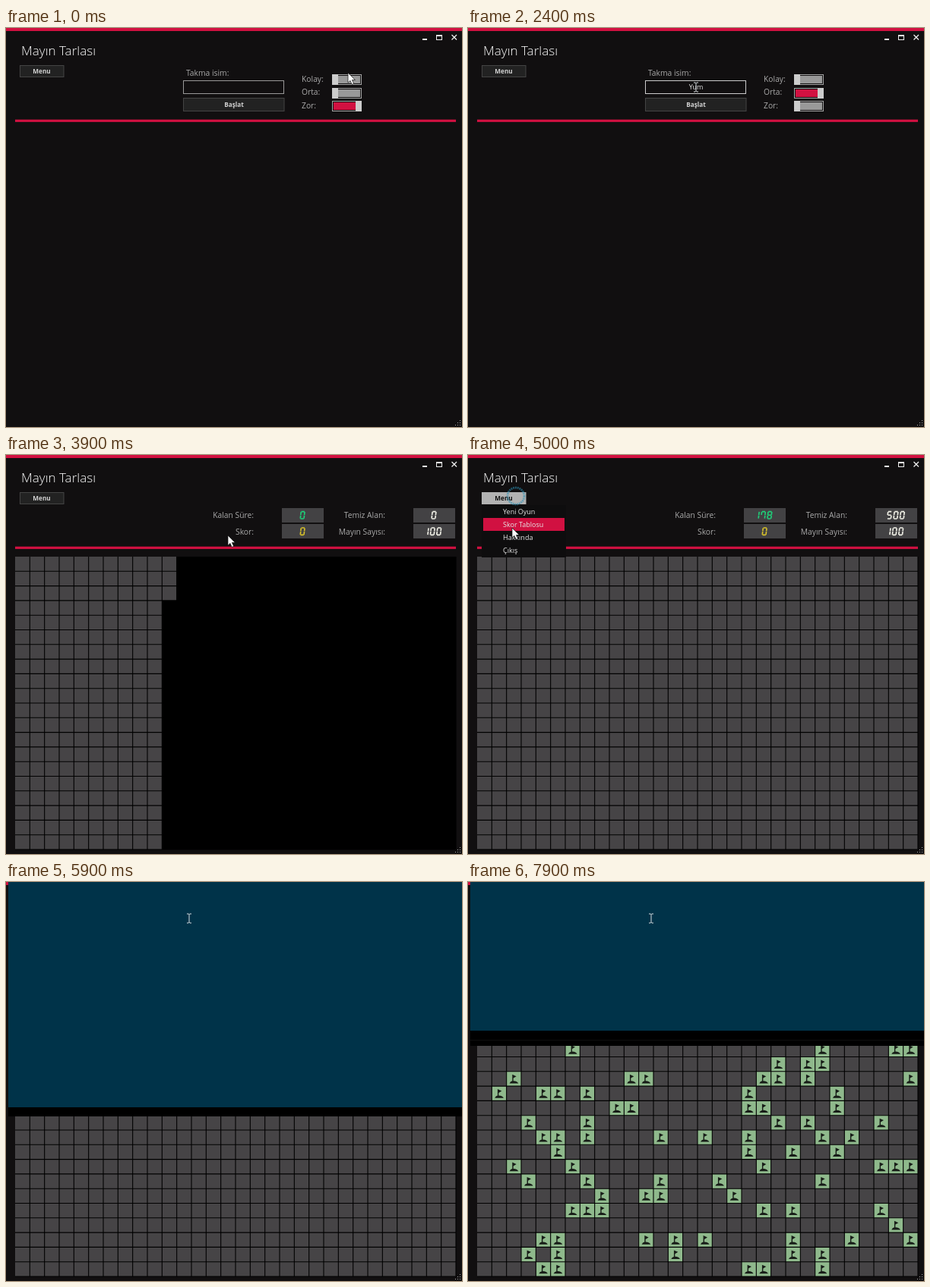
An HTML page for the animation above (8 s loop, 600 by 526 pixels).

```html
<!DOCTYPE html>
<html lang="tr">
<head>
<meta charset="utf-8">
<title>Mayın Tarlası</title>
<style>
  html, body { margin: 0; width: 100%; height: 100%; overflow: hidden; background: #110f10; }
  svg { display: block; width: 100vw; height: 100vh; }
  text { font-family: "Open Sans", "Noto Sans", sans-serif; fill: #dcdcdc; }
  .title { font-size: 17.1px; font-weight: 300; fill: #fff; }
  .label { font-size: 10.3px; fill: #aaa; }
  .btn { font-size: 8.2px; font-weight: 700; text-anchor: middle; }
  .item { font-size: 9px; fill: #e6e6e6; }
  .crisp { shape-rendering: crispEdges; }
  .end { text-anchor: end; }
</style>
</head>
<body>
<svg id="stage" viewBox="0 0 600 526"></svg>
<script>
const LOOP = 8000, STEP = 100;
const RED = '#d11141', BG = '#110f10', TILE = '#464446';
const COLS = 30, ROWS = 20, LEFT = 12, TOP = 134, CW = 580 / COLS, CH = 386 / ROWS;
const NAME = 'Yumak';

const colX = c => +(LEFT + c * CW).toFixed(2);
const rowY = r => +(TOP + r * CH).toFixed(2);
const clamp = (v, a = 0, b = 1) => Math.min(b, Math.max(a, v));
const ease = p => p * p * (3 - 2 * p);
const rect = (x, y, w, h, fill, extra = '') =>
  `<rect x="${x}" y="${y}" width="${w}" height="${h}" fill="${fill}" ${extra}/>`;
const text = (x, y, s, cls, extra = '') => `<text x="${x}" y="${y}" class="${cls}" ${extra}>${s}</text>`;

// Columns holding a mine, for each board row from FIRST_ROW down
const FIRST_ROW = 4;
const MINES = [
  [6, 23, 28, 29], [20, 22, 23], [2, 10, 11, 19, 20, 22, 29], [1, 4, 5, 7, 18, 24],
  [9, 10, 18, 19, 24], [3, 7, 20, 22, 27], [4, 5, 7, 12, 15, 18, 23, 25], [5, 18, 21, 24],
  [2, 6, 19, 27, 28, 29], [3, 7, 12, 16, 23], [8, 11, 12, 17], [6, 7, 8, 19, 21, 27],
  [28], [4, 5, 11, 13, 15, 21, 25, 29], [3, 5, 13, 21, 23], [4, 5, 18, 19, 23]
];

function flag(c, r) {
  const x = colX(c), y = rowY(r);
  return rect(x, y, CW, CH, '#8fb98c') +
    `<path transform="translate(${x} ${y})" fill="#171c17"
      d="M7.6 4L13 6.4L9 8.8V12.4Q14.5 12.8 15.5 15.6H4Q5 13 7.6 12.5Z"/>`;
}

function gridLines() {
  let d = '';
  for (let c = 1; c <= COLS; c++) d += `M${colX(c)} ${TOP}V520`;
  for (let r = 1; r <= ROWS; r++) d += `M${LEFT} ${rowY(r)}H592`;
  return `<path d="${d}" stroke="#000" stroke-width="1.1" fill="none"/>`;
}

const toggle = (id, y) =>
  rect(429.5, y + .5, 38, 13, BG, 'stroke="#a5a5a5"') +
  rect(431, y + 2, 35, 10, '#999', `id="${id}Fill"`) +
  rect(429, y, 8, 14, '#ccc', `id="${id}Knob"`);

const valueBox = (id, x, y, color) =>
  rect(x, y, 55, 19, '#434244') + `<path id="${id}" stroke="${color}" stroke-width="1.6" fill="none"/>`;

function grip() {
  let s = '';
  for (let i = 0; i < 3; i++)
    for (let j = 0; j <= i; j++) s += rect(597 - j * 3, 517 + i * 3, 1, 1, '#aaa');
  return s;
}

const MENU = ['Yeni Oyun', 'Skor Tablosu', 'Hakkında', 'Çıkış'];

document.getElementById('stage').innerHTML = `
  ${rect(0, 0, 600, 526, BG)}
  ${rect(0, 0, 600, 4, RED)}
  ${text(20, 35.8, 'Mayın Tarlası', 'title')}
  <g class="crisp" fill="none" stroke="#eee">
    <path d="M548 14.5H554" stroke-width="2"/>
    <path d="M566.5 9.5H573.5V15.5H566.5ZM566 10.5H574"/>
  </g>
  <path d="M586.5 9L593 15.5M593 9L586.5 15.5" stroke="#eee" stroke-width="1.3"/>
  ${rect(18.5, 49.5, 57.5, 15, '#222', 'id="menuBtn" stroke="#444"')}
  ${text(47, 60, 'Menu', 'btn', 'id="menuText"')}
  ${rect(12, 120.7, 580, 3.2, RED)}
  <g id="setup">
    ${text(237, 63, 'Takma isim:', 'label')}
    ${rect(233.5, 69.5, 132, 17, BG, 'id="field" stroke="#999"')}
    ${text(300, 81, '', 'item', 'id="nick" text-anchor="middle"')}
    ${rect(233.5, 92.5, 132.5, 17, '#222', 'id="startBtn" stroke="#444"')}
    ${text(300, 104, 'Başlat', 'btn', 'id="startText"')}
    ${text(389, 71, 'Kolay:', 'label')}${toggle('easy', 61)}
    ${text(389, 88, 'Orta:', 'label')}${toggle('mid', 79)}
    ${text(389, 106, 'Zor:', 'label')}${toggle('hard', 96)}
  </g>
  <g id="game">
    ${text(326, 83, 'Kalan Süre:', 'label end')}${valueBox('time', 363, 70, '#1fd079')}
    ${text(326, 104.5, 'Skor:', 'label end')}${valueBox('score', 363, 91, '#d8c22a')}
    ${text(499, 83, 'Temiz Alan:', 'label end')}${valueBox('clean', 536, 70, '#f2f2e8')}
    ${text(499, 104.5, 'Mayın Sayısı:', 'label end')}${valueBox('mines', 536, 91, '#f2f2e8')}
    ${rect(LEFT, TOP, 580, 386, '#000')}
    <path id="tiles" fill="${TILE}"/>
    <g id="flags">${MINES.map((row, i) => row.map(c => flag(c, i + FIRST_ROW)).join('')).join('')}</g>
    ${gridLines()}
  </g>
  ${grip()}
  <g id="menu">
    ${rect(18, 66, 111, 69, '#0e0d0e')}
    ${rect(20, 83, 107, 17, RED, 'id="hover"')}
    ${MENU.map((s, i) => text(46, 77.5 + i * 17, s, 'item')).join('')}
  </g>
  <g id="panel">
    ${rect(3, 0, 597, 1, '#000', 'id="band"')}
    ${rect(3, 0, 597, 1, '#0e0e0e', 'id="seam"')}
    ${rect(3, 0, 597, 1, '#003349', 'id="blue"')}
  </g>
  <circle id="ring" fill="none" stroke="#2b8fb4" stroke-width="2.8" stroke-dasharray="2 .8"/>
  <path id="arrow" d="M0 0V13.2L3 10.4L5.2 15.4L7.6 14.3L5.4 9.5H9.4Z" fill="#fff" stroke="#111" stroke-width=".7"/>
  <path id="beam" d="M-3 -6H-.8L0 -5.2L.8 -6H3M0 -5.2V5.2M-3 6H-.8L0 5.2L.8 6H3" fill="none" stroke="#d8dde0"/>`;

const el = {};
document.querySelectorAll('[id]').forEach(n => el[n.id] = n);
const set = (id, attrs) => { for (const k in attrs) el[id].setAttribute(k, attrs[k]); };
const show = (id, on) => set(id, { visibility: on ? 'visible' : 'hidden' });

// Seven-segment digits, leaning right
const DW = 4.8, DH = 9.4, MID = DH / 2;
const SEG = {
  a: [0, 0, DW, 0], b: [DW, 0, DW, MID], c: [DW, MID, DW, DH], d: [0, DH, DW, DH],
  e: [0, MID, 0, DH], f: [0, 0, 0, MID], g: [0, MID, DW, MID]
};
const DIGITS = ['abcdef', 'bc', 'abdeg', 'abcdg', 'bcfg', 'acdfg', 'acdefg', 'abcf', 'abcdefg', 'abcdfg'];

function digits(id, value, cx, top) {
  const chars = [...String(value)].map(Number);
  const advance = n => n === 1 ? 5 : 8.4;
  let x = cx - chars.reduce((s, n) => s + advance(n), 0) / 2 + 1.2;
  let d = '';
  for (const n of chars) {
    const ox = n === 1 ? x - 3.2 : x;
    const point = (u, v) => `${(ox + u + (DH - v) * .12).toFixed(2)} ${(top + v).toFixed(2)}`;
    for (const s of DIGITS[n]) {
      const [x1, y1, x2, y2] = SEG[s];
      const gx = x1 === x2 ? 0 : .3, gy = .3 - gx;
      d += `M${point(x1 + gx, y1 + gy)}L${point(x2 - gx, y2 - gy)}`;
    }
    x += advance(n);
  }
  set(id, { d });
}

// Pointer stops: time, x, y
const PATH = [
  [0, 450, 59], [400, 452, 83], [700, 452, 83], [1300, 172, 71], [1450, 172, 71],
  [1850, 300, 78], [2800, 300, 78], [3300, 293, 105], [3600, 292, 106], [4350, 292, 106],
  [4750, 64, 55], [4800, 64, 55], [5000, 58, 96], [5400, 58, 96], [5800, 241, 48], [LOOP, 241, 48]
];
const CLICKS = [[450, 452, 83], [1890, 300, 78], [3310, 291, 104], [4800, 63, 54], [5250, 58, 96]];

function pointer(t) {
  const i = PATH.findIndex(k => k[0] > t);
  const [t0, x0, y0] = PATH[i - 1], [t1, x1, y1] = PATH[i];
  const p = ease((t - t0) / (t1 - t0));
  return [x0 + (x1 - x0) * p, y0 + (y1 - y0) * p];
}

function setToggle(id, on) {
  set(id + 'Fill', { fill: on ? RED : '#999' });
  set(id + 'Knob', { x: on ? 460 : 429 });
}

function setButton(btn, label, fill) {
  set(btn, { fill: fill || '#222', stroke: fill || '#444' });
  el[label].style.fill = fill ? '#111' : '#d0d0d0';
}

function fillTiles(n) {
  const full = Math.floor(n / ROWS), rest = n % ROWS;
  let d = full ? `M${LEFT} ${TOP}H${colX(full)}V520H${LEFT}Z` : '';
  if (rest) d += `M${colX(full)} ${TOP}H${colX(full + 1)}V${rowY(rest)}H${colX(full)}Z`;
  set('tiles', { d });
}

function draw(t) {
  const [x, y] = pointer(t);
  const inside = (l, u, r, b) => x >= l && x <= r && y >= u && y <= b;
  const playing = t >= 3550, ready = t >= 4500, menuOpen = t >= 4850 && t < 5400;

  show('setup', !playing);
  show('game', playing);
  setToggle('easy', false);
  setToggle('mid', t >= 500);
  setToggle('hard', t < 500);
  el.nick.textContent = NAME.slice(0, clamp(Math.floor((t - 1980) / 120), 0, NAME.length));
  set('field', { stroke: t >= 1900 && t < 3300 ? '#ccc' : '#999' });
  setButton('startBtn', 'startText', !playing && inside(233, 92, 366, 110) && '#eeeeea');
  setButton('menuBtn', 'menuText', menuOpen ? '#b2b2b2' : inside(18, 49, 76, 65) && '#eee');

  fillTiles(Math.round(clamp((t - 3600) * .677, 0, COLS * ROWS)));
  digits('time', ready ? 180 - Math.floor((t - 4500) / 250) : 0, 390.2, 74.6);
  digits('score', 0, 390.2, 96);
  digits('clean', ready ? 500 : 0, 563, 74.6);
  digits('mines', 100, 563, 96);
  show('flags', t >= 7500);

  show('menu', menuOpen);
  show('hover', menuOpen && inside(20, 83, 127, 100));

  const drop = 1 - (1 - clamp((t - 5400) / 300)) ** 3;
  const lift = clamp((t - 7400) / 500);
  const edge = Math.round(297 * drop - 101 * lift);
  const band = lift ? 20 : 12;
  show('panel', edge > 0);
  set('blue', { height: Math.max(edge, 0) });
  set('band', { y: edge, height: band });
  set('seam', { y: edge + 12 });
  show('seam', lift > 0);

  const click = CLICKS.find(c => t >= c[0] && t < c[0] + 300);
  show('ring', !!click);
  if (click) {
    const p = (t - click[0]) / 300;
    set('ring', { cx: click[1], cy: click[2], r: 5 + 9 * p, opacity: 1 - p * .65 });
  }

  const typing = (!playing && inside(234, 70, 366, 87)) || (t > 5500 && y < edge);
  show('arrow', !typing);
  show('beam', typing);
  set(typing ? 'beam' : 'arrow', { transform: `translate(${x.toFixed(1)} ${y.toFixed(1)})` });
}

const start = performance.now();
function frame() {
  const t = (performance.now() - start) % LOOP;
  draw(Math.floor(t / STEP) * STEP);
  requestAnimationFrame(frame);
}
frame();
</script>
</body>
</html>
```
